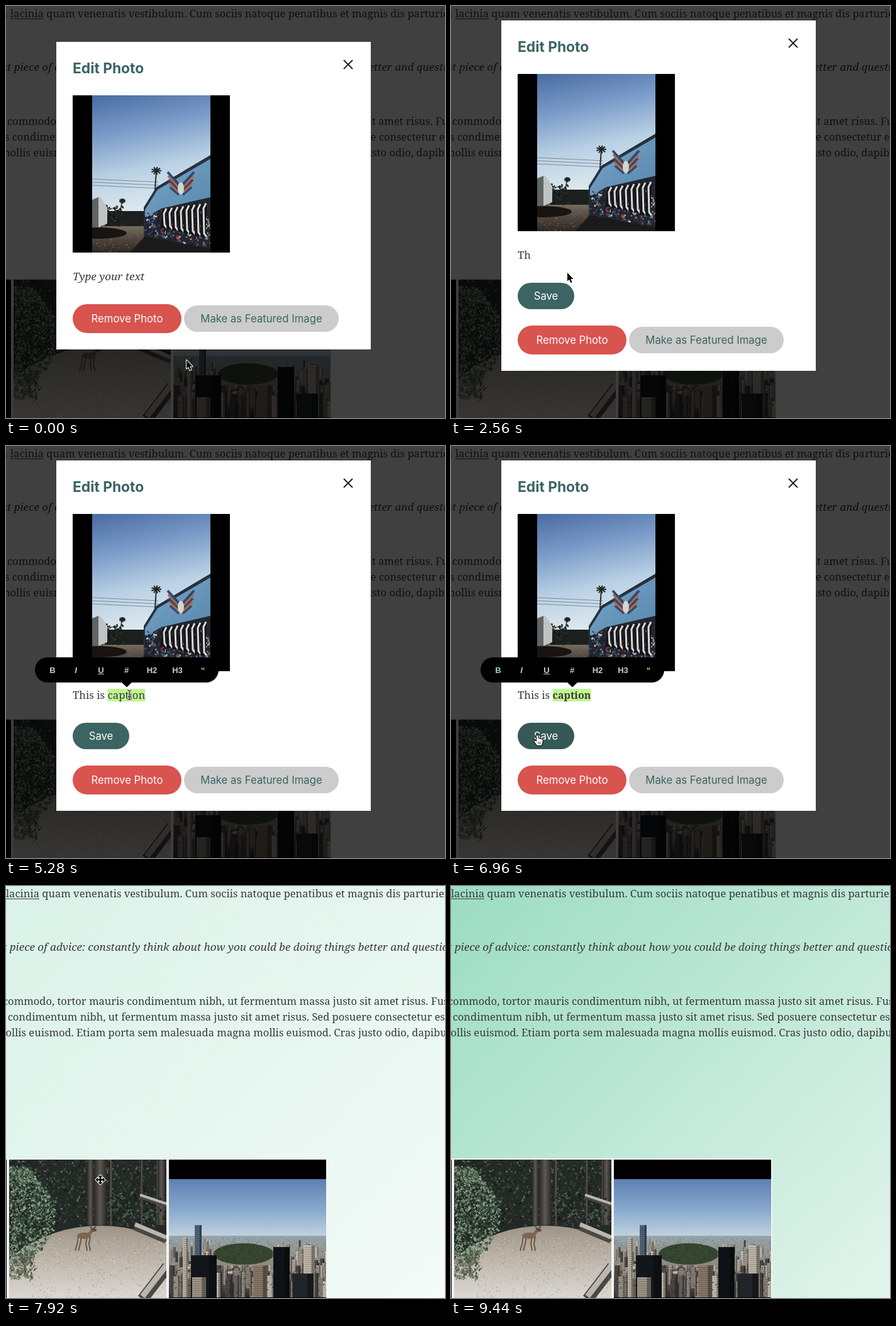
These frames come from a looping animation (698x655 px, 9.84 s). An HTML page with a canvas:

```html
<!DOCTYPE html>
<html lang="en">
<head>
<meta charset="utf-8">
<title>Edit photo</title>
<style>
html, body { margin: 0; width: 100%; height: 100%; overflow: hidden; background: #fff; }
canvas { display: block; }
</style>
</head>
<body>
<canvas id="stage" width="698" height="655"></canvas>
<script>
const W = 698, H = 655, LOOP = 9840, STEP = 80;
const SERIF = '"Noto Serif", serif', SANS = 'Inter, sans-serif', BAR = '"Liberation Sans", Arial, sans-serif';
const BODY = '16.5px ' + SERIF, ITALIC = 'italic 17.1px ' + SERIF;
const INK = '#3a3a3a', TEAL = '#3b6463';
const ctx = document.getElementById('stage').getContext('2d');
const clamp = (v, low = 0, high = 1) => Math.max(low, Math.min(high, v));

let seed = 7;
const rand = (size = 1) => size * (seed = (seed * 16807) % 2147483647) / 2147483647;
const pick = list => list[Math.floor(rand(list.length))];

function box(c, color, x, y, w, h) {
  c.fillStyle = color;
  c.fillRect(x, y, w, h);
}
function trace(c, p) {
  c.beginPath();
  for (let i = 0; i < p.length; i += 2) c.lineTo(p[i], p[i + 1]);
}
function poly(c, color, ...p) {
  trace(c, p);
  c.fillStyle = color;
  c.fill();
}
function line(c, color, width, ...p) {
  trace(c, p);
  c.strokeStyle = color;
  c.lineWidth = width;
  c.stroke();
}
function disc(c, color, x, y, rx, ry) {
  c.beginPath();
  c.ellipse(x, y, rx, ry, 0, 0, 7);
  c.fillStyle = color;
  c.fill();
}
function fade(c, x0, y0, x1, y1, ...colors) {
  const g = c.createLinearGradient(x0, y0, x1, y1);
  colors.forEach((color, i) => g.addColorStop(i / (colors.length - 1), color));
  return g;
}
// Scatters short strokes at the points that place() returns.
function scatter(c, n, size, colors, place) {
  while (n--) {
    const [x, y] = place();
    line(c, pick(colors), 0.5 + rand(size / 2), x, y, x + rand(size * 2) - size, y + rand(size * 2) - size);
  }
}
const within = (x, y, w, h) => () => [x + rand(w), y + rand(h)];

function photo(w, h, paint) {
  const canvas = document.createElement('canvas');
  canvas.width = w;
  canvas.height = h;
  paint(canvas.getContext('2d'));
  return canvas;
}

const forest = photo(250, 220, c => {
  const trunk = (x, w) => box(c, fade(c, x, 0, x + w, 0, '#2a2826', '#5d5852', '#2e2b29'), x, 0, w, 104);
  const log = (w, ...p) => {
    line(c, '#4b4743', w, ...p);
    c.save();
    c.translate(0, -w / 4);
    line(c, '#bab6b1', w / 2, ...p);
    c.restore();
  };
  box(c, '#232a26', 0, 0, 250, 220);
  scatter(c, 1500, 4, ['#41523f', '#131816', '#5d6f60', '#1c2420', '#303d34'], within(0, 0, 250, 105));
  for (let i = 0; i < 7; i++) trunk(95 + rand(150), 2 + rand(4));
  trunk(124, 10);
  trunk(135, 19);
  trunk(236, 12);
  scatter(c, 120, 5, ['#4e5f4c', '#1b221e'], within(155, 60, 95, 38));
  disc(c, fade(c, 0, 105, 0, 215, '#9d9486', '#beb6ab', '#d9d5cf'), 145, 265, 195, 160);
  scatter(c, 1300, 1.6, ['#a09789', '#c9c2b8', '#e2dfda', '#8f8779', '#d3cec7'], within(35, 125, 215, 95));
  const bush = () => {
    const u = rand();
    return [rand(28 + 46 * Math.sin(Math.PI * u)), 12 + 155 * u];
  };
  scatter(c, 500, 6, ['#2c3a30', '#3c4f40', '#50664f'], bush);
  scatter(c, 900, 4, ['#5f7d62', '#84a084', '#415746', '#71906f', '#9bb097'], bush);
  scatter(c, 220, 5, ['#6b735e', '#474f40', '#8b8d7b'], within(0, 150, 40, 40));
  log(8, 208, 58, 250, 72);
  log(13, 200, 106, 250, 127);
  log(18, 212, 222, 252, 170);
  for (let i = 0; i < 4; i++) {
    const x = 108 + i * 5 + (i > 1) * 4;
    line(c, '#65513f', 1.8, x + 2, 122, x, 134, x + (i > 1 ? 2 : -3), 145);
  }
  disc(c, '#7d6551', 119, 121, 11, 5);
  line(c, '#7d6551', 5, 126, 120, 133, 111);
  disc(c, '#5e4c3e', 135, 112, 4, 2.5);
  line(c, '#5b493b', 2, 129, 107, 133, 111, 138, 106);
});

const city = photo(250, 220, c => {
  const stone = ['#b0a697', '#8d8579', '#c8c0b3', '#6d675f', '#a0988c', '#4c4947'];
  const tower = (color, x, y, w, h = 220) => {
    box(c, color, x, y, w, h);
    box(c, 'rgba(0,0,0,.35)', x + w * 0.7, y, w * 0.3, h);
    for (let v = y + 3; v < y + h && v < 219; v += 3) box(c, 'rgba(0,0,0,.28)', x + 1, v, w - 2, 1);
  };
  box(c, '#000', 0, 0, 250, 220);
  box(c, fade(c, 0, 31, 0, 124, '#5d80b2', '#86a7cb', '#c3d4df'), 0, 31, 250, 92);
  box(c, fade(c, 0, 121, 0, 219, '#94a4ad', '#8d877c', '#2b2927'), 0, 121, 250, 98);
  scatter(c, 1100, 1.3, stone, within(0, 125, 250, 32));
  disc(c, '#36452f', 119, 150, 48, 17);
  scatter(c, 260, 2.5, ['#2a3826', '#43543a', '#35462f'], within(85, 139, 66, 24));
  disc(c, '#8fa0a6', 150, 135, 10, 1.2);
  // Nearer buildings stand lower, larger and darker.
  for (let i = 0; i < 260; i++) {
    const near = i / 260, x = rand(250), inPark = Math.abs(x - 115) < 50;
    tower(pick(stone), x, Math.max(132 + near * 65 - rand(10), inPark ? 168 : 0), 2 + near * 9, 8 + near * 40);
  }
  scatter(c, 300, 2, ['#151718', '#25282a', '#3a3c3d'], within(0, 172, 250, 48));
  tower('#52667a', 41, 104, 11);
  tower('#bdb4a6', 22, 124, 8);
  tower('#c3bbae', 214, 136, 18);
  tower('#15191e', 35, 152, 41);
  tower('#8a7a69', 134, 168, 22);
  tower('#101419', 166, 139, 26);
  tower('#24292e', 196, 181, 34);
  tower('#a1988b', 37, 187, 22);
  box(c, '#000', 0, 219, 250, 1);
});

const street = photo(250, 250, c => {
  const palm = (x, y, size, foot) => {
    line(c, '#2a2b2c', Math.max(1.5, size / 4), x, y, x - 3, foot);
    for (let a = 0; a < 6.2; a += 0.7)
      line(c, '#1d2522', 2, x, y, x + Math.cos(a) * size, y + Math.sin(a) * size * 0.8 + 1);
  };
  box(c, '#000', 0, 0, 250, 250);
  c.translate(31, 0);
  c.beginPath();
  c.rect(0, 0, 188, 250);
  c.clip();
  box(c, fade(c, 20, 0, 60, 185, '#4b6ea5', '#7b9cc8', '#b9d0e4', '#dde8ee'), 0, 0, 188, 250);
  for (let y = 133; y < 146; y += 5) line(c, '#667887', 0.8, 0, y, 105, y + 5);
  box(c, fade(c, 0, 205, 0, 250, '#7d7163', '#51473e', '#2b2724'), 0, 205, 188, 45);
  scatter(c, 150, 2, ['#8a7d6d', '#4a4038', '#675b4f'], within(0, 212, 100, 38));
  box(c, '#1b1f1e', 20, 184, 70, 24);
  scatter(c, 150, 5, ['#1a211c', '#29332a', '#101412'], within(18, 178, 32, 28));
  poly(c, '#bfc3c3', 0, 166, 12, 161, 24, 178, 24, 204, 0, 214);
  poly(c, '#5f6467', 0, 166, 10, 162, 10, 210, 0, 214);
  disc(c, '#171411', 10, 219, 45, 9);
  palm(48, 167, 5, 182);
  palm(102, 119, 8, 165);
  palm(172, 114, 10, 140);
  poly(c, '#27313d', 82, 178, 102, 146, 188, 95, 188, 250, 82, 229);
  poly(c, fade(c, 100, 140, 188, 240, '#6f9dc0', '#4f7ea6'), 84, 182, 104, 150, 188, 101, 188, 250, 84, 224);
  for (const side of [-1, 1])
    for (let i = 0; i < 5; i++)
      line(c, i % 2 ? '#b9683e' : '#2c4a78', 4, 141 + side * 3, 158 - i * 4, 141 + side * (17 + i), 146 - i * 6);
  disc(c, '#d3d6d4', 141, 148, 5, 10);
  poly(c, '#22252f', 84, 195, 110, 180, 188, 162, 188, 250, 84, 224);
  scatter(c, 260, 5, ['#5b8db4', '#7f3a36', '#a8765c', '#344f71', '#15171d', '#cbc9c3'], within(86, 186, 102, 52));
  for (let i = 0; i < 8; i++) {
    const x = 115 + i * 9, y = 182 - i * 1.2, foot = 211 + i * 2;
    line(c, '#12141a', 8, x, y, x - 2, foot);
    line(c, '#dcdad3', 3, x + 3, y - 2, x - 1, y + 6, x, foot - 5, x + 4, foot);
  }
  poly(c, '#1b1a1a', 60, 250, 84, 224, 188, 244, 188, 250);
});

function text(s, x, y, font, color = INK, align = 'left') {
  ctx.font = font;
  ctx.fillStyle = color;
  ctx.textAlign = align;
  ctx.fillText(s, x, y);
  return ctx.measureText(s).width;
}
function pill(color, x, y, w, h) {
  ctx.beginPath();
  ctx.roundRect(x, y, w, h, h / 2);
  ctx.fillStyle = color;
  ctx.fill();
}
function button(label, x, y, w, h, color, ink) {
  pill(color, x, y, w, h);
  text(label, x + w / 2, y + h / 2 + 5.5, '16.7px ' + SANS, ink, 'center');
}

function drawPage(t) {
  box(ctx, '#fff', 0, 0, W, H);
  ctx.globalAlpha = Math.sin(clamp((t - 7840) / 320) * Math.PI / 2);
  box(ctx, fade(ctx, 0, 0, 676, 676, '#9bdcc2', '#bfe8d7', '#e2f4ec'), 0, 0, W, H);
  ctx.globalAlpha = 1;
  ctx.save();
  ctx.translate(t < 7440 ? 7 : 0, 0);
  text('a', -14, 18, BODY);
  const link = text('lacinia', 0, 18, BODY);
  box(ctx, INK, 0, 20, link, 1);
  text(' quam venenatis vestibulum. Cum sociis natoque penatibus et magnis dis parturient montes', link, 18, BODY);
  text('st piece of advice: constantly think about how you could be doing things better and question', -13, 103, ITALIC);
  text('commodo, tortor mauris condimentum nibh, ut fermentum massa justo sit amet risus. Fusce', -5, 189, BODY);
  text('s condimentum nibh, ut fermentum massa justo sit amet risus. Sed posuere consectetur est', -9, 214, BODY);
  text('mollis euismod. Etiam porta sem malesuada magna mollis euismod. Cras justo odio, dapibus', -16, 239, BODY);
  box(ctx, '#f3f3f3', -10, 433, 521, 230);
  box(ctx, '#000', -10, 435, 11, 220);
  ctx.drawImage(forest, 5, 435);
  ctx.drawImage(city, 259, 435);
  ctx.restore();
}

// Bursts of typing, one letter per step: start time and letter count.
const CAPTION = 'This is caption';
const BURSTS = [[1760, 1], [2080, 1], [2720, 6], [3280, 2], [3520, 4], [3920, 1]];

function typing(t) {
  let count = 0, last = 800;
  for (const [start, letters] of BURSTS) {
    const n = clamp((t - start) / STEP + 1, 0, letters);
    count += n;
    if (n) last = start + (n - 1) * STEP;
  }
  return [count, last];
}

function drawCaption(t, y) {
  if (t < 800) return text('Type your text', 106, y, ITALIC);
  const font = '16.8px ' + SERIF;
  if (t < 5120) {
    const [count, last] = typing(t);
    const width = text(CAPTION.slice(0, count), 106, y, font);
    if ((t - last) % 960 < 480) box(ctx, '#222', Math.round(106 + width), y - 16, 1, 20);
    return;
  }
  const x = 106 + text('This is ', 106, y, font);
  const wordFont = t < 6400 ? font : 'bold 16px ' + SERIF;
  ctx.font = wordFont;
  box(ctx, '#bff690', x, y - 16, ctx.measureText('caption').width, 20);
  text('caption', x, y, wordFont);
}

function drawToolbar(t) {
  const bold = t >= 6400, font = 'bold 13px ' + BAR, gray = '#ccc';
  const item = (s, x, color = gray, style = '') => text(s, x, 360.5, style + font, color, 'center');
  ctx.save();
  ctx.globalAlpha *= clamp((t - 5040) / 240);
  ctx.translate(bold ? 1 : 0, 0);
  pill('#000', 46, 336, 292, 40);
  poly(ctx, '#000', 183, 375, 201, 375, 192, 383.5);
  item('B', 74, bold ? '#97d9c6' : gray);
  item('I', 111, gray, 'italic ');
  item('U', 151);
  box(ctx, gray, 146, 362, 10, 1);
  ['#', 'H2', 'H3', '“'].forEach((s, i) => item(s, 191.5 + i * 40.5));
  ctx.restore();
}

function drawModal(t) {
  const alpha = 1 - clamp((t - 7120) / 320);
  if (!alpha) return;
  const open = t >= 1760, top = open ? 23 : 57, foot = top + (open ? 485 : 417);
  ctx.save();
  ctx.globalAlpha = alpha;
  box(ctx, 'rgba(0,0,0,.75)', 0, 0, W, H);
  box(ctx, '#fff', 80, top, 500, open ? 557 : 489);
  text('Edit Photo', 106, top + 50, 'bold 22.8px ' + SANS, TEAL);
  for (const d of [-7, 7]) line(ctx, '#222', 2, 544 - d, top + 29, 544 + d, top + 43);
  ctx.drawImage(street, 106, top + 85);
  drawCaption(t, top + 379);
  button('Remove Photo', 106, foot, 173, 46, '#d9534f', '#fff');
  button('Make as Featured Image', 283, foot + 2, 246, 42, '#ccc', TEAL);
  if (open) {
    ctx.globalAlpha = alpha * clamp((t - 1680) / 240);
    button('Save', 106, top + 417, 90, 42, t >= 6880 ? '#355957' : TEAL, '#fff');
    ctx.globalAlpha = alpha;
  }
  if (t >= 5120) drawToolbar(t);
  ctx.restore();
}

function outlined(fill, edge, ...p) {
  ctx.lineJoin = 'round';
  trace(ctx, p);
  ctx.closePath();
  ctx.strokeStyle = edge;
  ctx.lineWidth = 2;
  ctx.stroke();
  ctx.fillStyle = fill;
  ctx.fill();
}
const cursors = {
  arrow() {
    outlined('#000', '#fff', 1, 1, 1, 14.5, 4, 11.8, 6.3, 17, 8.6, 16, 6.3, 11, 10.5, 11);
  },
  beam() {
    for (const [color, width] of [['#fff', 3], ['#222', 1]]) {
      for (const x of [-3, 3]) line(ctx, color, width, x, -8, 0, -7, 0, 7, x, 8);
      line(ctx, color, width, -2, 2.5, 2, 2.5);
    }
  },
  hand() {
    outlined('#fff', '#000', -1, 0, 1, 0, 2, 5, 8, 6.5, 9, 8, 7, 16, 0, 16, -4.5, 10, -4, 8, -1, 10);
    for (const x of [2, 4.5]) line(ctx, '#000', 0.8, x, 10, x, 14);
  },
  move() {
    const arm = [[1.2, -1.2], [4, -1.2], [4, -3.5], [7.5, 0], [4, 3.5], [4, 1.2]], p = [];
    for (let i = 0; i < 4; i++) {
      const c = Math.cos(i * Math.PI / 2), s = Math.sin(i * Math.PI / 2);
      for (const [x, y] of arm) p.push(x * c - y * s, x * s + y * c);
    }
    outlined('#000', '#fff', ...p);
  }
};

// Pointer moves: start, duration, end point, shape from then on.
const MOVES = [
  [0, 320, 203, 437, 'arrow'], [400, 240, 184, 423, 'beam'], [1680, 80, 184, 423, 'arrow'],
  [4240, 400, 340, 478, 'arrow'], [4640, 320, 196, 396, 'beam'], [5360, 880, 72, 358, 'hand'],
  [6480, 160, 76, 362, 'hand'], [6720, 240, 137, 460, 'hand'], [7120, 240, 150, 467, 'move'],
  [8560, 480, 400, 370, 'arrow'], [9040, 400, 455, 680, 'move']];

function drawCursor(t) {
  let x = 286, y = 562, shape = 'arrow';
  for (const [start, time, toX, toY, next] of MOVES) {
    const p = clamp((t - start) / time);
    x += (toX - x) * p;
    y += (toY - y) * p;
    if (p === 1) shape = next;
  }
  ctx.save();
  ctx.translate(Math.round(x), Math.round(y));
  cursors[shape]();
  ctx.restore();
}

function frame() {
  const t = Math.floor(performance.now() % LOOP / STEP) * STEP;
  drawPage(t);
  drawModal(t);
  drawCursor(t);
  requestAnimationFrame(frame);
}
frame();
</script>
</body>
</html>
```
